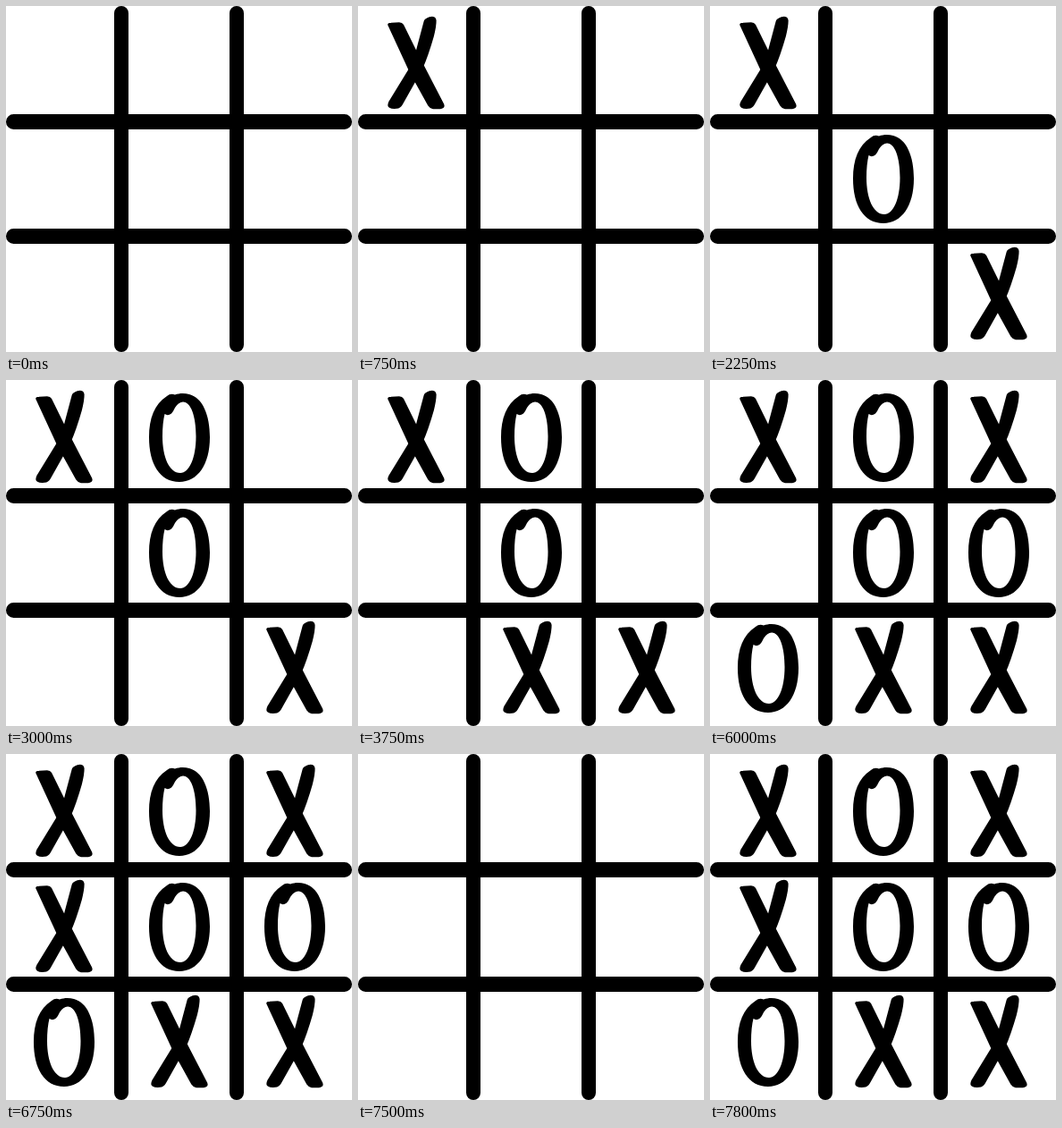
An HTML page that plays this animation: 387 px wide and 387 px high, repeating every 8000 ms.

```html
<!DOCTYPE html>
<html lang="en">
<head>
<meta charset="utf-8">
<title>Noughts and crosses</title>
<style>
  html, body { margin: 0; width: 100%; height: 100%; overflow: hidden; background: #fff; }
  svg { display: block; width: 100%; height: 100%; }
</style>
</head>
<body>
<svg viewBox="0 0 387 387">
  <defs>
    <g id="X" stroke="#000" stroke-width="1.600" stroke-linejoin="round">
      <path d="M34 21Q34 19.500 37 19.500L46 19Q49 19 50.500 21.500L67.500 56L95.500 110Q97 114 92 114.500L84 114.500Q81 114 79 111L58 73Z"/>
      <path d="M74.500 17Q75.500 14.500 80 13Q86.500 11.500 86.800 16Q87 22 84 34Q78 55 71.500 70L49 110Q47 113.500 43 114Q38 114.500 35.500 113Q33 111.500 35 107.500L58 70Q64 60 66.500 47Z"/>
    </g>
    <path id="O" fill-rule="evenodd" d="M51 18Q55 14.500 60 16.500C65 14.500 71 14.500 76 16C91 20 99 39 99 64C99 95 85 114 65 114C43 114 31 94 31 64C31 43 37 27 51 18Z
      M69 24.500C78 24.500 83.500 41 83.500 63C83.500 87 76 104 66 104C53.500 104 46 86 46 63Q46 48 48.500 38Q52 40.500 56 37.500Q58 35.500 60 31Q64 24.500 69 24.500Z"/>
  </defs>
  <g fill="none" stroke="#000" stroke-linecap="round">
    <path d="M129 8V379M258 8V379" stroke-width="16"/>
    <path d="M8.500 129.500H378.500M8.500 257.500H378.500" stroke-width="17"/>
  </g>
  <g id="marks"></g>
</svg>
<script>
  const LOOP = 8000, STEP = 750, PITCH = 129;
  const BLANK_START = 7500, BLANK_END = 7800;
  // Cells in playing order, numbered row by row; X moves first.
  const moves = [0, 4, 8, 1, 7, 6, 2, 5, 3];
  const layer = document.getElementById('marks');

  const marks = moves.map((cell, turn) => {
    const mark = document.createElementNS('http://www.w3.org/2000/svg', 'use');
    mark.setAttribute('href', turn % 2 ? '#O' : '#X');
    mark.setAttribute('x', cell % 3 * PITCH);
    mark.setAttribute('y', Math.floor(cell / 3) * PITCH);
    layer.append(mark);
    return mark;
  });

  function render(time) {
    const blank = time >= BLANK_START && time < BLANK_END;
    const played = blank ? 0 : Math.floor(time / STEP);
    marks.forEach((mark, turn) => {
      mark.style.display = turn < played ? '' : 'none';
    });
  }

  const start = performance.now();
  function tick() {
    render((performance.now() - start) % LOOP);
    requestAnimationFrame(tick);
  }
  tick();
</script>
</body>
</html>
```
